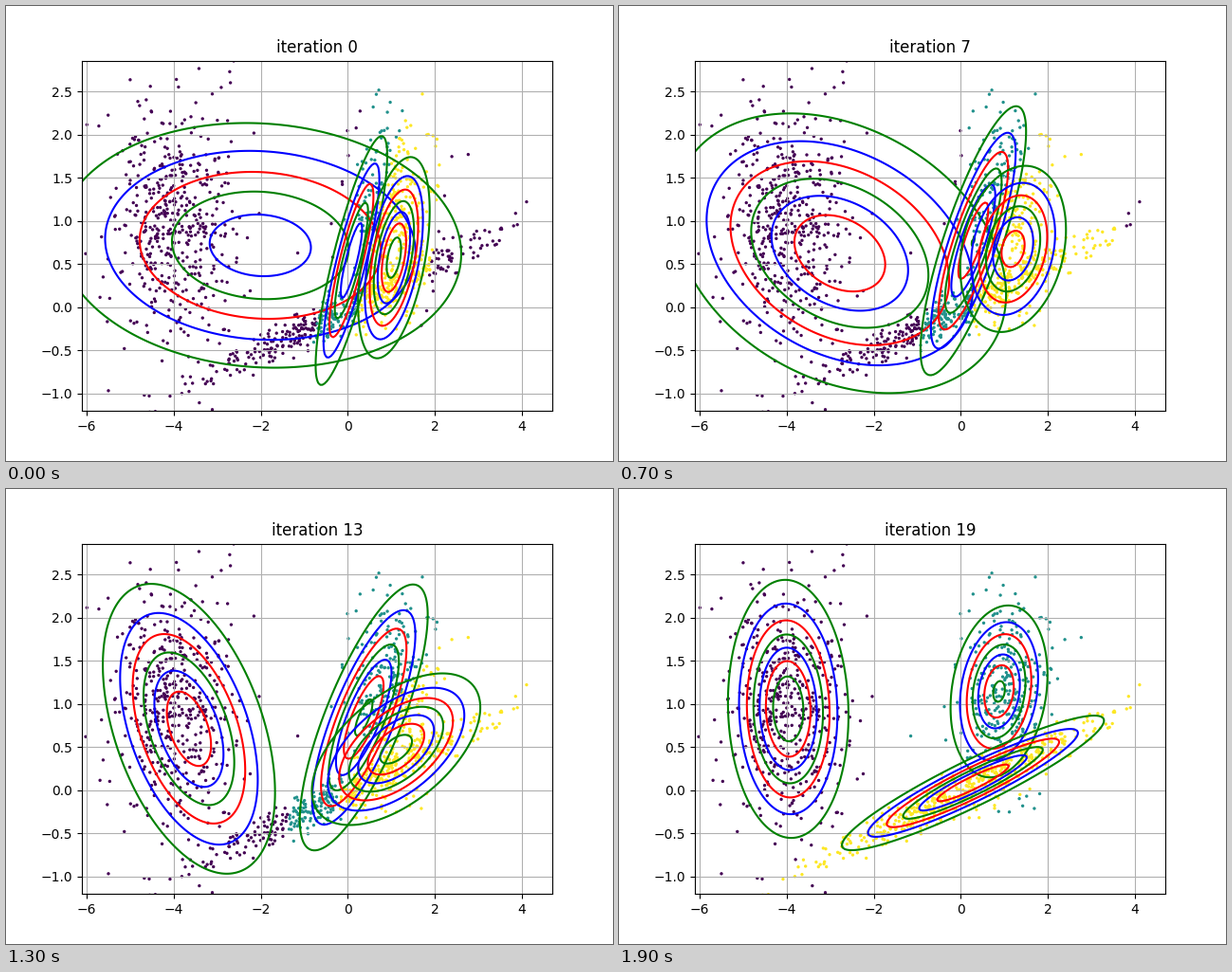
Recreate the animation shown at these times as a matplotlib script. Size 640 by 480 pixels, loop 2 s.

```python
import numpy as np
import matplotlib.pyplot as plt
from matplotlib.animation import FuncAnimation
from matplotlib.ticker import MaxNLocator

FRAMES, INTERVAL = 20, 100
XLIM, YLIM = (-6.11, 4.70), (-1.2055, 2.862)

# Key poses of the three Gaussians: mean x, mean y, sd x, sd y, correlation
KEYS = {
    0: [(-2.01, .717, 2.49, .766, -.07), (.084, .541, .437, .768, .843), (1.06, .574, .408, .580, .467)],
    5: [(-2.50, .629, 2.20, .807, -.22), (.259, .739, .565, .782, .820), (1.17, .684, .548, .518, .220)],
    13: [(-3.65, .712, 1.01, .859, -.44), (.367, .844, .738, .775, .770), (1.11, .475, .963, .438, .550)],
    16: [(-3.82, .800, .826, .835, -.32), (.552, 1.02, .767, .682, .710), (.792, .277, 1.22, .399, .787)],
    19: [(-3.965, .943, .679, .735, -.05), (.879, 1.146, .560, .502, .19), (.280, .084, 1.53, .397, .926)],
}
STEPS = np.array(list(KEYS))
POSES = np.array(list(KEYS.values()))
SLOPES = np.gradient(POSES, STEPS, axis=0)
FIRST_WEIGHTS, LAST_WEIGHTS = np.array([.50, .20, .30]), np.array([.37, .27, .36])


def make_points():
    rng = np.random.default_rng(4)
    left = rng.normal((-3.97, .95), (.69, .75), (480, 2))
    right = rng.normal((1.0, 1.05), (.53, .57), (340, 2))
    band = rng.normal(0, (1.75, .11), (470, 2))
    band[:, 1] += .25 * band[:, 0]
    return np.vstack([left, right, band])


def pose_at(i):
    """Cubic Hermite blend of the key poses."""
    k = min(np.searchsorted(STEPS, i, side="right") - 1, len(STEPS) - 2)
    h = STEPS[k + 1] - STEPS[k]
    t = (i - STEPS[k]) / h
    return ((1 + 2 * t) * (1 - t) ** 2 * POSES[k] + t * (1 - t) ** 2 * h * SLOPES[k]
            + t * t * (3 - 2 * t) * POSES[k + 1] + t * t * (t - 1) * h * SLOPES[k + 1])


def peak(comp):
    _, _, sx, sy, rho = comp
    return 1 / (2 * np.pi * sx * sy * np.sqrt(1 - rho ** 2))


def density(x, y, comp):
    mx, my, sx, sy, rho = comp
    u, v = (x - mx) / sx, (y - my) / sy
    return peak(comp) * np.exp(-(u * u - 2 * rho * u * v + v * v) / (2 * (1 - rho ** 2)))


def levels_below(top):
    ticks = MaxNLocator(8, min_n_ticks=1).tick_values(0, top)
    return [v for v in ticks if 1e-9 < v < top]


px, py = make_points().T
gx, gy = np.meshgrid(np.linspace(*XLIM, 220), np.linspace(*YLIM, 220))

fig, ax = plt.subplots(figsize=(6.4, 4.8), dpi=100)


def update(i):
    ax.clear()
    comps = pose_at(i)
    t = i / (FRAMES - 1)
    weights = (1 - t) * FIRST_WEIGHTS + t * LAST_WEIGHTS
    label = np.argmax([w * density(px, py, c) for w, c in zip(weights, comps)], axis=0)
    ax.scatter(px, py, s=2, c=label, cmap="viridis", vmin=0, vmax=2)
    for c in comps:
        levels = levels_below(peak(c))
        colors = ["gbr"[k % 3] for k in range(len(levels))]
        ax.contour(gx, gy, density(gx, gy, c), levels=levels, colors=colors)
    ax.set_xlim(XLIM)
    ax.set_ylim(YLIM)
    ax.grid(True)
    ax.set_title(f"iteration {i}")
    return []


anim = FuncAnimation(fig, update, frames=FRAMES, interval=INTERVAL,
                     init_func=lambda: [], repeat=True, repeat_delay=0)
plt.show()
```
